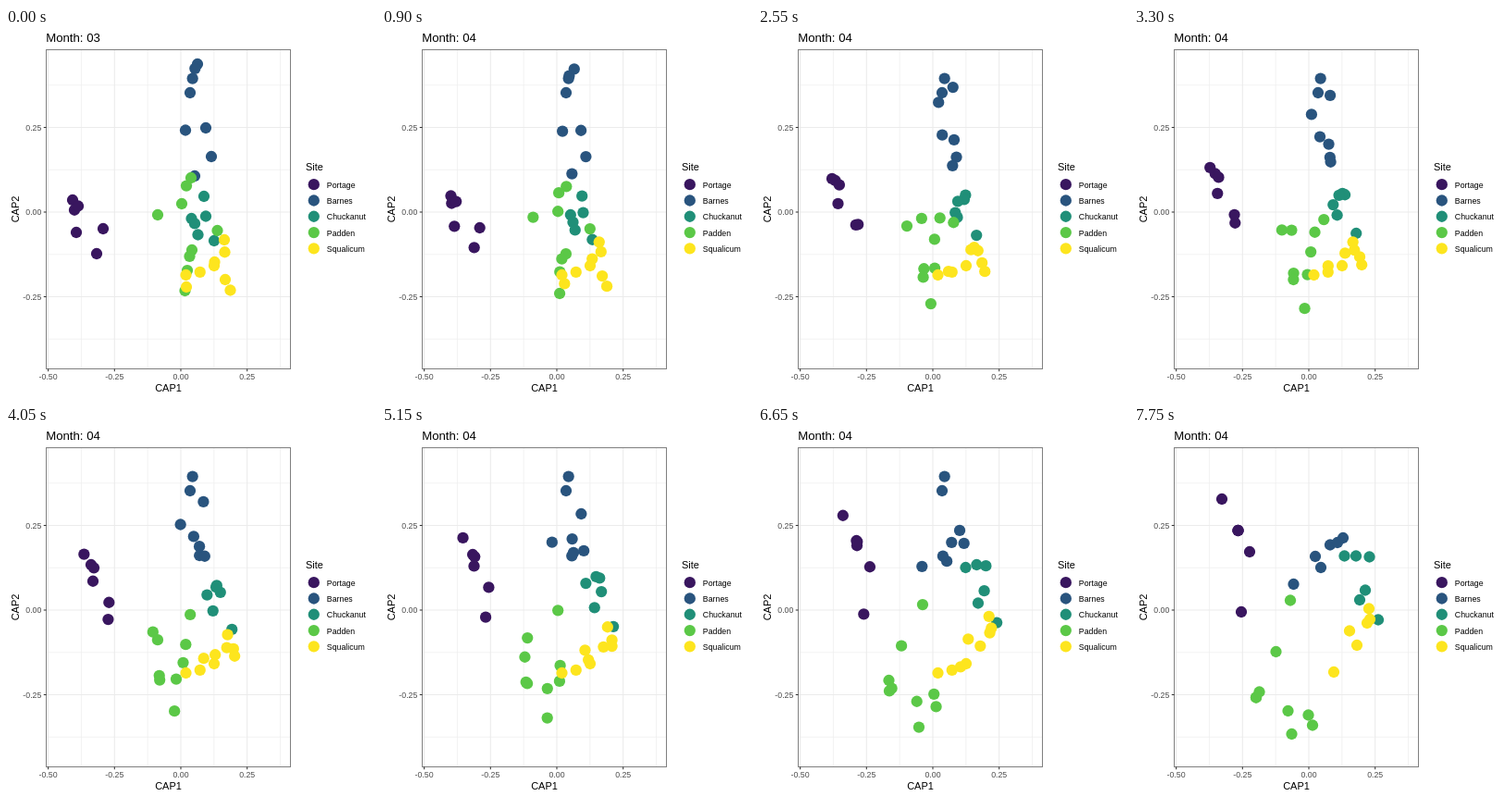
Animation, 400 px wide and 400 px high, one loop 8 s. Source, as an HTML page with a canvas:

```html
<!DOCTYPE html>
<html lang="en">
<head>
<meta charset="utf-8">
<title>Ordination by month</title>
<style>
html, body { margin: 0; width: 100%; height: 100%; overflow: hidden; background: #fff; }
canvas { display: block; width: 400px; height: 400px; }
</style>
</head>
<body>
<canvas id="plot"></canvas>
<script>
const LOOP = 8000, HOLD = 500, STEP = 50, STEPS = 146;
const RADIUS = 6.15;
const LEFT = 43.5, TOP = 23.5, RIGHT = 307.5, BOTTOM = 368.5;
const X_TICKS = [-0.5, -0.25, 0, 0.25];
const Y_TICKS = X_TICKS.slice(1);
const FONT = '"Liberation Sans", Arial, sans-serif';

const lerp = (a, b, t) => a + (b - a) * t;

// A column of n points whose gaps widen downwards.
const trail = (n, [x0, y0], [x1, y1]) => Array.from({ length: n }, (_, i) => {
  const t = i / (n - 1);
  return [lerp(x0, x1, t), lerp(y0, y1, t ** 1.7)];
});

const portageHub = [112.5, 113];
const paddenHub = [132, 293.5];

// Points pair up by order; those without a partner stay put and leave with the last step.
const sites = [
  { name: 'Portage', color: '#39165f',
    from: [...trail(3, [72, 186], [76, 221]), [78, 192.5], [105, 217], [98, 244]],
    to: [portageHub, [95, 79], portageHub, portageHub, [116, 201], [125, 136]] },
  { name: 'Barnes', color: '#29547e',
    from: [[194, 110.5], [216, 108], [222, 139], [204, 160], ...trail(4, [207, 39], [199, 70])],
    to: [[212, 128.5], [202, 153], [196, 141], [226, 121], [220, 126], [172.5, 171]] },
  { name: 'Chuckanut', color: '#208f78',
    from: [[214, 182], [216, 203.5], [225, 230], ...trail(3, [200.5, 206], [207.5, 223.5])],
    to: [[250, 177.5], [240, 140.5], [264, 209.5], [254.5, 141.5], [244, 188], [227.5, 140.5]] },
  { name: 'Padden', color: '#5bc847',
    from: [...trail(3, [200, 162], [190, 190]), [164, 202], [228.5, 219],
      ...trail(4, [201, 240], [193.5, 284])],
    to: [[188.5, 312.5], paddenHub, [193, 323.5], [153.5, 244], [169, 188.5],
      [166.5, 308], paddenHub, [135.5, 287.5], [170.5, 333]] },
  { name: 'Squalicum', color: '#fde51e',
    from: [...trail(3, [236, 229], [237, 272]), [225.5, 253], [195, 280], [242.5, 283.5],
      ...trail(3, [194.5, 267], [225, 257])],
    to: [[216, 266], [241, 237], [255, 209], [254, 197.5], [233, 221.5], [252, 213]] }
];

const canvas = document.getElementById('plot');
const ctx = canvas.getContext('2d');
const ratio = window.devicePixelRatio || 1;
canvas.width = canvas.height = 400 * ratio;

const xAt = v => 189 + v * 286.8;
const yAt = v => 199 - v * 366;

function line(x1, y1, x2, y2, color, width = 1.07) {
  ctx.strokeStyle = color;
  ctx.lineWidth = width;
  ctx.beginPath();
  ctx.moveTo(x1, y1);
  ctx.lineTo(x2, y2);
  ctx.stroke();
}

function text(str, x, y, size, color = '#000', align = 'left') {
  ctx.font = size + 'px ' + FONT;
  ctx.fillStyle = color;
  ctx.textAlign = align;
  ctx.fillText(str, x, y);
}

function dot(x, y, color) {
  ctx.fillStyle = color;
  ctx.beginPath();
  ctx.arc(x, y, RADIUS, 0, Math.PI * 2);
  ctx.fill();
}

function drawGrid() {
  const grid = (xs, ys, width) => {
    xs.forEach(v => line(xAt(v), TOP, xAt(v), BOTTOM, '#ebebeb', width));
    ys.forEach(v => line(LEFT, yAt(v), RIGHT, yAt(v), '#ebebeb', width));
  };
  const between = X_TICKS.map(v => v + 0.125);
  grid(between, between, 0.65);
  grid(X_TICKS, Y_TICKS);
}

function drawAxes() {
  ctx.strokeStyle = '#7f7f7f';
  ctx.lineWidth = 1;
  ctx.strokeRect(LEFT, TOP, RIGHT - LEFT, BOTTOM - TOP);
  X_TICKS.forEach(v => {
    line(xAt(v), BOTTOM, xAt(v), BOTTOM + 2.75, '#333');
    text(v.toFixed(2), xAt(v), 380, 8.8, '#4d4d4d', 'center');
  });
  Y_TICKS.forEach(v => {
    line(LEFT - 2.75, yAt(v), LEFT, yAt(v), '#333');
    text(v.toFixed(2), 38.4, yAt(v) + 3.2, 8.8, '#4d4d4d', 'right');
  });
  text('CAP1', 175.5, 393, 11, '#000', 'center');
  ctx.save();
  ctx.translate(14, 196);
  ctx.rotate(-Math.PI / 2);
  text('CAP2', 0, 0, 11, '#000', 'center');
  ctx.restore();
}

function drawLegend() {
  text('Site', 324, 154, 11);
  sites.forEach(({ name, color }, i) => {
    const y = 169.2 + i * 17.28;
    dot(332.8, y, color);
    text(name, 346.8, y + 3.55, 8.8);
  });
}

function drawPoints(step) {
  const t = step / STEPS;
  for (const { color, from, to } of sites) {
    from.forEach(([x, y], i) => {
      if (to[i]) dot(lerp(x, to[i][0], t), lerp(y, to[i][1], t), color);
      else if (step < STEPS) dot(x, y, color);
    });
  }
}

function draw(time) {
  const step = Math.max(0, Math.min(STEPS, Math.floor((time - HOLD) / STEP) + 1));
  ctx.setTransform(ratio, 0, 0, ratio, 0, 0);
  ctx.fillStyle = '#fff';
  ctx.fillRect(0, 0, 400, 400);
  drawGrid();
  drawPoints(step);
  drawAxes();
  drawLegend();
  text('Month: ' + (step ? '04' : '03'), 43.2, 15, 13.2);
}

const start = performance.now();
function tick() {
  draw((performance.now() - start) % LOOP);
  requestAnimationFrame(tick);
}
tick();
</script>
</body>
</html>
```
